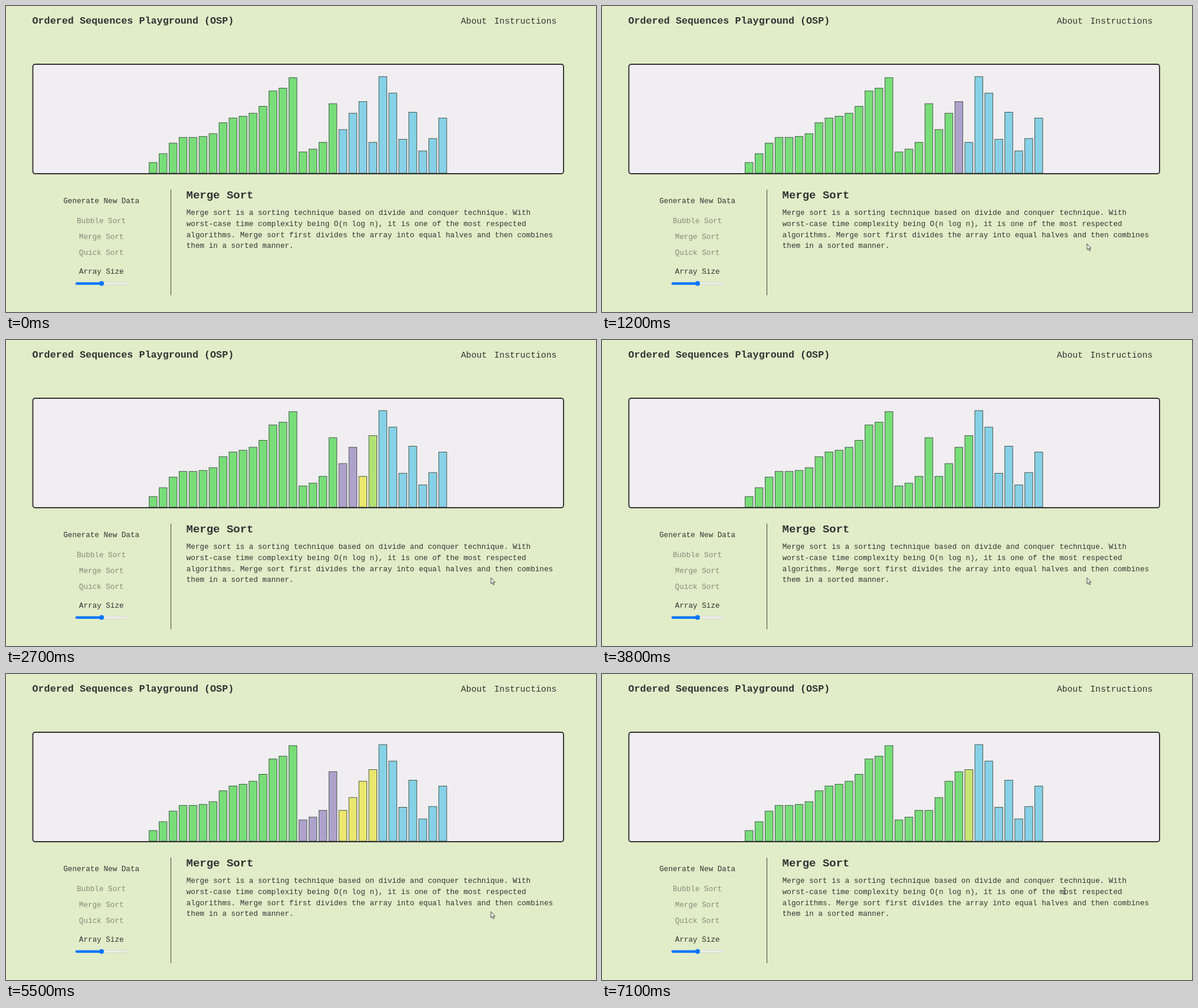
Animation, 1000 px wide and 520 px high, one loop 7.2 s. Source, as an HTML page:

```html
<!DOCTYPE html>
<html lang="en">
<head>
<meta charset="utf-8">
<title>Merge sort</title>
<style>
html, body { margin: 0; width: 100%; height: 100%; overflow: hidden; background: #e1ecc8; }
svg { display: block; }
text { font: 12.63px "Liberation Mono", "Courier New", monospace; fill: #333; white-space: pre; }
.title { font-size: 16.75px; font-weight: bold; }
.nav { font-size: 14.7px; }
.head { font-size: 19px; font-weight: bold; }
.menu { text-anchor: middle; }
.off { fill: #858b7c; }
#bars rect { stroke: #3b4a42; stroke-width: .9; }
</style>
</head>
<body>
<svg width="1000" height="520" viewBox="0 0 1000 520">
  <text class="title" x="44.5" y="30">Ordered Sequences Playground (OSP)</text>
  <text class="nav" x="771" y="30">About</text>
  <text class="nav" x="827.5" y="30">Instructions</text>

  <rect x="45.5" y="99" width="899.5" height="186" rx="4" fill="#f0eef0"/>
  <g id="bars"></g>
  <rect x="45.5" y="99" width="899.5" height="186" rx="4" fill="none" stroke="#333" stroke-width="1.9"/>

  <g class="menu">
    <text x="161.7" y="335">Generate New Data</text>
    <text class="off" x="161.7" y="369">Bubble Sort</text>
    <text class="off" x="161.7" y="396">Merge Sort</text>
    <text class="off" x="161.7" y="423">Quick Sort</text>
    <text x="161.7" y="455">Array Size</text>
  </g>
  <rect x="118" y="469.8" width="88" height="3.6" rx="1.8" fill="#efefef" stroke="#c9cabf" stroke-width=".6"/>
  <rect x="117.7" y="469.5" width="44" height="4.2" rx="2" fill="#0075ff"/>
  <circle cx="162" cy="471.6" r="4" fill="#0075ff"/>
  <path d="M279.5 312V491.5" stroke="#444" stroke-width="1"/>

  <text class="head" x="305.5" y="327">Merge Sort</text>
  <text x="305.8" y="355">Merge sort is a sorting technique based on divide and conquer technique. With</text>
  <text x="305.8" y="373.8">worst-case time complexity being O(n log n), it is one of the most respected</text>
  <text x="305.8" y="392.5">algorithms. Merge sort first divides the array into equal halves and then combines</text>
  <text x="305.8" y="411.3">them in a sorted manner.</text>

  <path id="arrow" d="M0 0V10.2L2.3 8.1L4 12L5.6 11.3L4 7.6H7.1Z" fill="#f4f4f4" stroke="#222" stroke-width=".8"/>
  <path id="beam" d="M-2-5.5Q0-5.5 0-4.5Q0-5.5 2-5.5M0-4.5V4.5M-2 5.5Q0 5.5 0 4.5Q0 5.5 2 5.5" fill="none" stroke="#222" stroke-width="1"/>
</svg>
<script>
const LOOP = 7200, FADE = 150, BASE = 284;
const GREEN = [120, 221, 120], BLUE = [135, 209, 230], PURPLE = [174, 162, 203], YELLOW = [235, 231, 110];
const tops = [266, 251, 233, 223.3, 223.3, 221.7, 217, 198.3, 190.3, 187.3, 182.2, 170.5, 144.3, 139.7, 121.8,
  248, 243.2, 231.8, 166, 210, 182.2, 162.5, 231.8, 120, 148, 226.5, 180.5, 246.2, 225.2, 190.4];
const get = id => document.getElementById(id);

const bars = tops.map((top, i) => {
  const el = document.createElementNS("http://www.w3.org/2000/svg", "rect");
  el.setAttribute("x", 242.6 + 16.93 * i);
  el.setAttribute("width", 13.4);
  get("bars").append(el);
  return { el, start: [top, ...(i < 19 ? GREEN : BLUE)], changes: [] };
});

// [step, ms]: the pace of the sort varies slightly
const pace = [[0, 150], [4, 1060], [11, 2657], [16, 3810], [20, 4650], [24, 5610], [27, 6284], [31, 7076]];
function along(points, x) {
  const n = points.findIndex(p => p[0] >= x);
  if (n < 0) return points.at(-1)[1];
  if (n === 0) return points[0][1];
  const [a, b] = points[n - 1], [c, d] = points[n];
  return b + (d - b) * (x - a) / (c - a);
}

let step = 0;
const values = [...tops];
function change(i, color) {
  bars[i].changes.push({ at: along(pace, step++), to: [values[i], ...color] });
}
function merge(lo, mid, hi) {
  for (let i = lo; i < mid; i++) change(i, PURPLE);
  for (let i = mid; i < hi; i++) change(i, YELLOW);
  const sorted = values.slice(lo, hi).sort((a, b) => b - a);
  sorted.forEach((top, k) => {
    values[lo + k] = top;
    change(lo + k, GREEN);
  });
}
merge(19, 20, 21);
merge(21, 22, 23);
merge(19, 21, 23);
merge(15, 19, 23);

const clamp = x => Math.min(1, Math.max(0, x));
const ease = x => 1 - (1 - clamp(x)) ** 2;
const mouseX = [[100, 1004], [700, 822], [6850, 822], [7080, 784]];
const mouseY = [[100, 522], [700, 404], [6850, 404], [7080, 369]];

function draw(now) {
  const t = now % LOOP;
  for (const { el, start, changes } of bars) {
    let v = start;
    for (const { at, to } of changes) {
      const p = ease((t - at) / FADE);
      v = v.map((a, k) => a + (to[k] - a) * p);
    }
    const [top, ...rgb] = v;
    el.setAttribute("y", top);
    el.setAttribute("height", BASE - top);
    el.setAttribute("fill", `rgb(${rgb.map(Math.round)})`);
  }
  const x = along(mouseX, t), y = along(mouseY, t);
  const overText = t > 6850 && y < 398;
  for (const [id, shown] of [["arrow", t >= 100 && !overText], ["beam", overText]]) {
    get(id).setAttribute("transform", `translate(${x} ${y})`);
    get(id).setAttribute("visibility", shown ? "visible" : "hidden");
  }
}
const begin = performance.now();
function tick() {
  draw(performance.now() - begin);
  requestAnimationFrame(tick);
}
tick();
</script>
</body>
</html>
```
